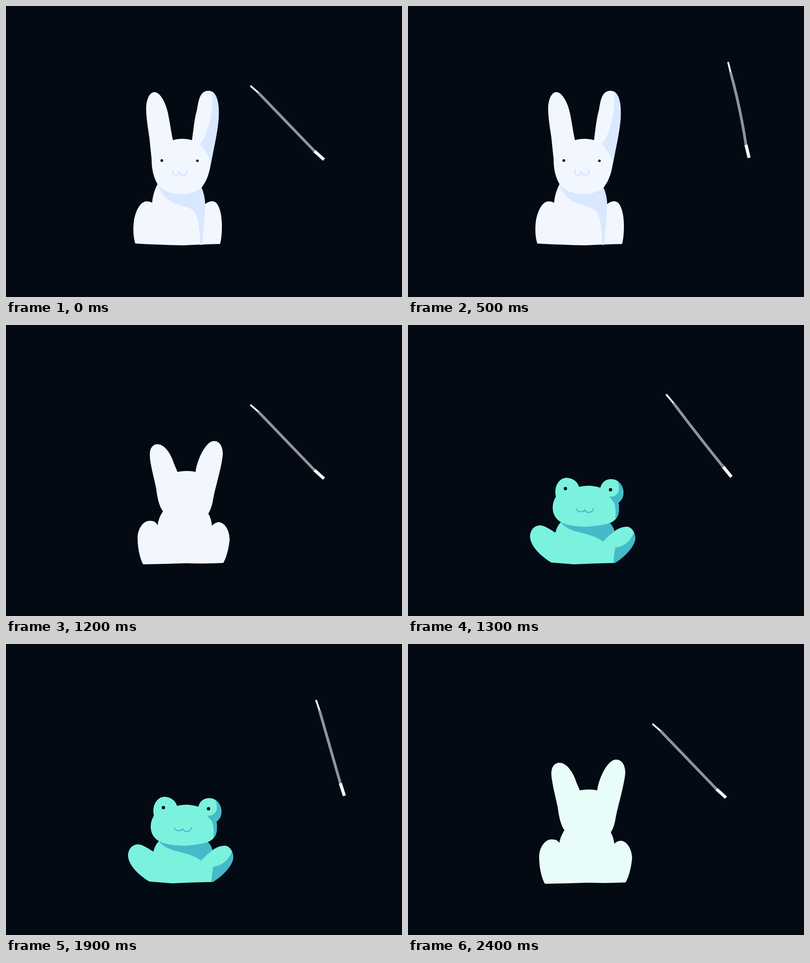
Recreate the animation shown at these times as an HTML page. Size 873 by 642 pixels, loop 2500 ms.

```html
<!DOCTYPE html>
<html lang="en">
<head>
<meta charset="utf-8">
<title>Wand spell</title>
<style>
  html, body { margin: 0; width: 100%; height: 100%; overflow: hidden; background: #030a14; }
  svg { display: block; width: 873px; height: 642px; }
  .line, #wand path { fill: none; stroke-linecap: round; }
  #wand path { stroke: #f8f9ff; }
  #wand #shaft { stroke: #93939b; stroke-linecap: butt; }
  #wand #grip { stroke-linecap: butt; }
</style>
</head>
<body>
<svg viewBox="0 0 873 642">
  <g id="bunny" fill="#f2f7ff">
    <path d="M285 524C280 508 280 490 282 474C286 450 297 431 310 431Q317 431 322 434Q324 412 334 393C325 377 321 360 321 338L316 290C312 262 309 245 309 227C309 205 317 190 327 190C340 190 352 213 357 236C361 255 364 278 368 296C380 292 398 292 410 296C413 275 415 250 421 229C424 213 426 187 446 187C462 187 470 207 469 242C468 270 460 305 452 346C448 370 443 385 431 401Q438 416 439 437C448 430 458 428 465 436C473 447 476 466 476 486C476 500 475 513 472 525Q430 526 392 528Q340 527 285 524Z"/>
    <g fill="#d9e7ff">
      <path d="M455 189C467 197 470 220 469 242C468 270 460 305 452 346Q444 322 427 305C441 288 448 262 452 240C455 220 456 205 454 189Z"/>
      <path d="M334 393C346 408 365 415 388 415C405 415 420 409 431 401Q438 416 439 437C437 470 436 500 432 527L428 527C428 500 425 475 419 460C413 446 398 444 380 438C358 431 340 415 334 393Z"/>
    </g>
    <path class="line" stroke="#d9e7ff" stroke-width="3.5" d="M368 363C365 377 382 377 382 364C382 377 400 377 399 362"/>
    <g fill="#030a14"><circle cx="343.5" cy="341" r="3"/><circle cx="422" cy="341.5" r="2.8"/></g>
  </g>
  <g id="frog" fill="#7af2de">
    <path d="M316 524C295 512 269 488 269 466C270 450 280 442 292 442C303 443 314 452 325 458Q328 444 337 435C324 427 319 415 319 403Q319 390 326 379C321 358 332 337 350 337C364 338 374 346 377 357Q400 351 424 359C427 347 436 340 448 340C463 340 475 353 475 370Q475 384 464 392Q467 410 462 422Q457 432 445 437Q453 445 455 455C466 447 475 445 483 445C494 446 501 458 501 472C499 490 477 512 456 525L416 526Q390 527 366 528Q340 526 316 524Z"/>
    <g fill="#45bac8">
      <path d="M462 344C470 350 475 360 475 370Q475 384 464 392Q467 410 462 422L457 428C459 410 457 395 453 390Q449 384 443 379C455 380 463 373 465 364Q465 352 462 344Z"/>
      <path d="M337 435C355 443 375 445 395 445Q425 443 445 437Q453 445 455 455Q441 466 430 478C415 466 395 462 380 458C362 454 345 447 337 435Z"/>
      <path d="M498 457Q501 464 501 472C499 490 477 512 456 525L453 524Q454 505 457 491C478 489 493 474 498 457Z"/>
    </g>
    <path class="line" stroke="#45bac8" stroke-width="2.5" d="M371 406C375 414 388 414 389 407C392 416 406 416 409 405"/>
    <g fill="#030a14"><circle cx="347" cy="361" r="3.7"/><circle cx="446.5" cy="363.5" r="3.7"/></g>
  </g>
  <path id="morph" stroke-width="2" d="M301 526C294 510 290 490 290 468C291 447 304 432 316 432C325 432 330 433 334 442Q336 426 346 411C338 400 334 385 331 360C326 335 317 305 317 285C317 270 325 263 334 263C350 263 364 285 370 305L378 324Q400 320 418 324C420 305 431 278 443 265C450 257 455 256 459 256C471 256 478 268 478 285C476 308 468 335 462 360C455 385 457 398 446 416Q453 428 454 443C460 436 466 435 470 435C484 437 493 455 493 474C491 495 485 515 479 525Q440 527 398 525.5Q350 527 303 528Z"/>
  <g id="wand">
    <path id="tip" stroke-width="4"/>
    <path id="grip" stroke-width="7"/>
    <path id="shaft"/>
  </g>
</svg>
<script>
const $ = id => document.getElementById(id);
const STEP = 100, STEPS = 25;

// Wand poses, from pointing at the figure to raised:
// tip x y, shaft start x y, shaft end x y, grip end x y, bow, shaft width
const poses = [
  [540, 177, 556, 191, 680, 320, 701, 339, 0, 6],
  [570, 154, 585, 172, 695, 313, 713, 335, -2, 6],
  [601, 138, 613, 157, 708, 309, 725, 333, -3, 6.5],
  [659, 125, 666, 149, 724, 306, 737, 333, -1, 7],
  [684, 125, 691, 146, 737, 307, 746, 335, 0, 6],
  [706, 125, 711, 146, 745, 306, 752, 335, 5, 6]
];
// One swing: raise, hold, strike
const swing = [1, 2, 3, 4, 5, 5, 4, 3, 2, 1, 0, 0];

function drawWand([tx, ty, ax, ay, bx, by, gx, gy, bow, width]) {
  $('tip').setAttribute('d', `M${tx} ${ty}L${ax} ${ay}`);
  $('grip').setAttribute('d', `M${bx} ${by}L${gx} ${gy}`);
  $('shaft').setAttribute('d', `M${ax} ${ay}Q${(ax + bx) / 2 + bow} ${(ay + by) / 2} ${bx} ${by}`);
  $('shaft').setAttribute('stroke-width', width);
}

function show(id, on) {
  $(id).style.display = on ? '' : 'none';
}

function draw(n) {
  const toFrog = n === 12, toBunny = n === 24;
  show('bunny', n < 12);
  show('frog', n > 12 && n < 24);
  show('morph', toFrog || toBunny);
  $('morph').setAttribute('fill', toFrog ? '#f2f7ff' : '#e8fcfa');
  $('morph').setAttribute('stroke', toFrog ? 'none' : '#e8fcfa');
  drawWand(poses[n ? swing[(n - 1) % swing.length] : 0]);
}

const start = performance.now();
function tick() {
  draw(Math.floor((performance.now() - start) / STEP) % STEPS);
  requestAnimationFrame(tick);
}
tick();
</script>
</body>
</html>
```
